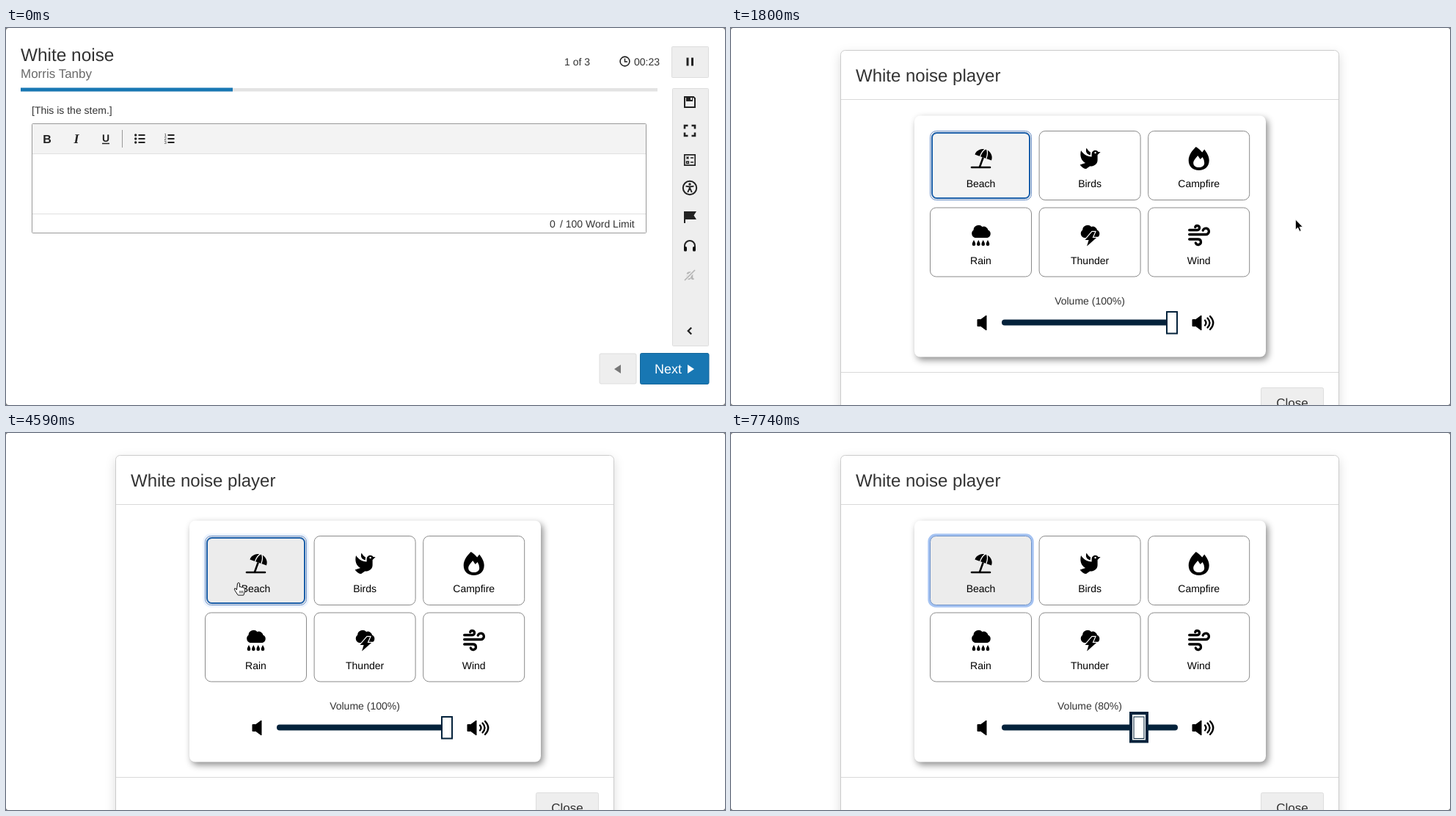
Recreate the animation shown at these times as an HTML page. Size 980x514 px, loop 8250 ms.

```html
<!DOCTYPE html>
<html lang="en">
<head>
<meta charset="utf-8">
<title>White noise player</title>
<style>
html, body { margin: 0; width: 100%; height: 100%; overflow: hidden; background: #777; }
svg { display: block; width: 980px; height: 514px; border-radius: 4px; background: #fff;
  font: 14px "Liberation Sans", Arial, sans-serif; text-rendering: geometricPrecision; }
.line { fill: none; stroke: currentColor; stroke-width: 2; }
.mid { text-anchor: middle; }
#dialog .frame { filter: drop-shadow(0 5px 7px rgba(0,0,0,.14)); }
#dialog .card { filter: drop-shadow(3px 4px 5px rgba(0,0,0,.45)); }
</style>
</head>
<body>
<svg id="stage" viewBox="0 0 980 514"></svg>
<script>
const LOOP = 8250, NAVY = '#04223b', BLUE = '#1877b3';

const at = (x, y, body, extra = '') => `<g transform="translate(${x} ${y})" ${extra}>${body}</g>`;
const path = (d, extra = '') => `<path d="${d}" ${extra}/>`;
const line = (d, width = 2, extra = '') => path(d, `class="line" style="stroke-width:${width}" ${extra}`);
const box = (x, y, w, h, fill, stroke = 'none', r = 0, extra = '') =>
  `<rect x="${x}" y="${y}" width="${w}" height="${h}" rx="${r}" fill="${fill}" stroke="${stroke}" ${extra}/>`;
const text = (x, y, s, size = 14, fill = '#333', extra = '') =>
  `<text x="${x}" y="${y}" font-size="${size}" fill="${fill}" ${extra}>${s}</text>`;

const tools = [
  [101, line('M-7-7H5L7-5V7H-7Z') + path('M-5-7H4V-1H-5Z') + path('M1-6h2v3h-2z', 'fill="#eee"')],
  [140, line('M-7-2.5V-7H-2.5M2.5-7H7V-2.5M7 2.5V7H2.5M-2.5 7H-7V2.5', 2.6)],
  [180, line('M-7.2-7.2H7.2V7.2H-7.2Z', 1.7) + line('M-4.5-4.5l3 3m0-3l-3 3M1-3H5M1 3H5M-4.5 2h3v2.5h-3z', 1.4)],
  [218, '<circle r="9.2" class="line"/><circle cy="-5" r="1.7"/>' +
    line('M-5.5-2.3L0-1.5L5.5-2.3M-2.8 6L0 0L2.8 6M0-2V1', 1.8)],
  [258, path('M-8-8H9L5.5-2.5L9 3H-6V8H-8Z')],
  [297, line('M-7 5V0a7 7 0 0 1 14 0V5', 2) + box(-8, 1, 4, 6.5, '#111', 'none', 1.5) + box(4, 1, 4, 6.5, '#111', 'none', 1.5)],
  [337, text(0, 6, 'a', 20, '#b5b5b5', 'class="mid" font-weight="bold"') +
    line('M-7 7L7-7', 4, 'color="#eee"') + line('M-7 7L7-7', 1.7, 'color="#b5b5b5"')],
  [413, line('M2.2-4.5L-2.2 0L2.2 4.5', 2.3)]
];

const rows = [-5, 0, 5];
const page = `
  ${text(20, 45, 'White noise', 24.4)}
  ${text(20, 67.5, 'Morris Tanby', 17, '#6a6a6a')}
  ${text(761, 51, '1 of 3')}
  ${at(843.5, 45.5, '<circle r="6.4" class="line" style="stroke-width:1.6"/>' + line('M0-4V.5H3.5', 1.5))}
  ${text(856, 51, '', 14, '#333', 'id="timer"')}
  ${box(20, 82, 868, 4.5, '#e3e3e3')}${box(20, 81.5, 289, 5, BLUE)}
  ${box(907.5, 25.5, 50, 42, '#eee', '#ddd', 1)}
  ${path('M927.5 40.5h3v11h-3zM934 40.5h3v11h-3z', 'id="pause"')}
  ${path('M929 41L939 46.5L929 52Z', 'id="play"')}
  ${box(908.5, 82.5, 49, 351, '#eee', '#ddd', 1)}
  ${box(909, 279, 48, 37.5, '#f6f6f6', '#1f6fb5', 0, 'stroke-width="2" id="phones"')}
  ${tools.map(([y, icon]) => at(932, y, icon)).join('')}
  ${text(35, 116.5, '[This is the stem.]')}
  ${box(35.5, 130.5, 837, 149, '#fff', '#999', 1)}
  ${box(36, 131, 836, 40, '#f3f3f3')}
  ${line('M36 171.5H872M36 253.5H872', 1, 'color="#e0e0e0"')}
  ${line('M158.5 139V163', 1, 'color="#999"')}
  ${text(56, 157, 'B', 16, '#222', 'class="mid" font-weight="bold"')}
  ${text(96, 157, 'I', 18, '#222', 'class="mid" font-weight="bold" font-style="italic" font-family="Liberation Serif, serif"')}
  ${text(136, 155, 'U', 14, '#222', 'class="mid" font-weight="bold"')}${line('M131 157.5H141', 1.4)}
  ${at(182, 151, rows.map(y => `<circle cx="-5.3" cy="${y}" r="1.7"/>` + line(`M-1.5 ${y}H7.5`)).join(''))}
  ${at(222, 151, rows.map((y, i) => text(-6.5, y + 2.2, i + 1, 6) + line(`M-1.5 ${y}H7.5`)).join(''))}
  ${text(741, 271.5, '0')}${text(755, 271.5, '/ 100 Word Limit')}
  ${box(809, 444, 50, 41, '#eee', '#ddd', 2)}${path('M838 459V471L829 465Z', 'fill="#777"')}
  ${box(864.5, 443.5, 93.5, 42, BLUE, '#14679b', 2)}
  ${text(884, 471, 'Next', 18, '#fff')}${path('M929 459V471L938 465Z', 'fill="#fff"')}`;

const cloud = path('M-8 3.5A6 6 0 0 1-10-7A7 7 0 0 1 2-11.5A6 6 0 0 1 10-7A5.6 5.6 0 0 1 9 3.5Z');
const sounds = [
  ['Beach', line('M-12.5 12H12.5', 2.6, 'stroke-linecap="round"') +
    at(2.5, -2.5, path('M-12 0A12 11.5 0 0 1 12 0Z') + line('M0 0V14', 2.6) +
      line('M-4.5 0Q-4.5-8-1-12M4.5 0Q4.5-8 1-12', 1.3, 'color="#fff"'), 'style="rotate:20deg"')],
  ['Birds', path('M14.5-9L10.5-5V2C10.5 8 5 11 0 10.5L-5 14C-8 14-11 12-13.5 8.5L-6 6C-12 3-14-4-12-11C-9-6-4-3 2.5-2.5V-6C2.5-11 9-13 11.5-9Z') +
    path('M.5-4.5C-4-6-6.500-9-4.500-14.500C-3-11.500-1-9.500 1-8.500Z') + '<circle cx="7.500" cy="-8" r="1.200" fill="#fff"/>'],
  ['Campfire', path('M-4-16C-9-11-14-5-14 2.500C-14 11-8 16 0 16S14 11 14 2.500C14-3 11-8 7.500-12.500L4.500-8.500C2-12-1-14-4-16Z') +
    path('M-1.500-4C-4-1-7.500 3-7.500 6C-7.500 10-4 12 0 12S7.500 10 7.500 6Q7.500 2 5-2L2 1Z', 'fill="#fff"')],
  ['Rain', cloud + [-9.500, -3.200, 3.200, 9.500].map(x => path(`M${x} 6.500q-4.600 8 0 8t0-8`)).join('')],
  ['Thunder', cloud + path('M3-4.500L-6.500 6.500H-1.500L-4 15L9 3.500H3.500L7-4.500Z', 'stroke="#fff" stroke-width="2.4" paint-order="stroke"')],
  ['Wind', line('M-13-7H-2a3 3 0 1 0-3-4M-13-1H9.500a4.200 4.200 0 1 0-4-5.500M-13 5.500H-1a3.700 3.700 0 1 1-3.400 5', 3.3, 'stroke-linecap="round"')]
].map(([name, icon], i) => ({ name, icon, x: 271.5 + i % 3 * 148.6, y: i < 3 ? 140.5 : 245 }));

const soundButton = ({ name, icon, x, y }) => at(x, y, `
  ${box(-1.5, -1.5, 141, 97, 'none', '#a5c3f2', 9, 'stroke-width="3.4" class="ring"')}
  ${box(0, 0, 138, 94, '#fff', '#8a8a8a', 8, 'class="face"')}
  ${box(2.5, 2.5, 133, 89, 'none', '#1b5faa', 6.5, 'stroke-width="2" class="inner"')}
  ${at(69, 37.5, icon)}
  ${text(69, 76.5, name, 14, '#000', 'class="mid"')}`, 'class="sound"');

const speaker = path('M-7.5-4.500h4.500l7.500-5.500v20l-7.500-5.500h-4.500z', 'stroke="#000" stroke-linejoin="round"');
const dialog = `
  ${box(149.5, 30.5, 679, 560, '#fff', '#ccc', 6, 'class="frame"')}
  ${line('M150 97.5H828M150 469.5H828', 1, 'color="#d9d9d9"')}
  ${text(170, 73, 'White noise player', 24)}
  ${box(250, 119.5, 479, 329, '#fff', 'none', 8, 'class="card"')}
  ${sounds.map(soundButton).join('')}
  ${text(489, 377, '', 14, '#333', 'class="mid" id="volume"')}
  ${box(369, 397.5, 240, 8, NAVY, 'none', 4)}
  <g id="thumb">
    ${box(-11, 382, 22, 38.5, '#fff', NAVY, 0, 'stroke-width="4" id="halo"')}
    ${box(-7, 387, 14, 29.5, '#fff', NAVY, 0, 'id="knob"')}
  </g>
  ${at(343.5, 402, speaker)}${at(636.5, 402, speaker)}
  ${line('M646 398.5q3 3.500 0 7M649.5 395.5q6 6.500 0 13M653 393q8.500 9 0 18', 2.3, 'stroke-linecap="round"')}
  ${box(722.5, 490.5, 85, 42, '#eee', '#ddd', 2)}
  ${text(765, 517, 'Close', 17, '#333', 'class="mid"')}`;

const stage = document.getElementById('stage');
stage.innerHTML = `
  <g fill="#222" color="#222">${page}</g>
  ${box(0, 0, 980, 514, '#fff', 'none', 0, 'id="veil"')}
  <g id="dialog" color="#000">${dialog}</g>
  <circle id="press" fill="none" stroke="#111" stroke-width="1.4"/>
  <g id="cursor">
    ${path('M0 0V14.500L3.300 11.400L5.600 16.600L8 15.600L5.800 10.500H10.300Z', 'id="arrow" fill="#000" stroke="#fff"')}
    <g id="hand" stroke="#111">
      ${path('M-1.500 1q1.500-2 3 0v5q1.500-1 2.500.4q1.500-.8 2.400.5q1.800-.4 2.200 1v4l-1.800 5.200h-7.500l-3.600-5.200q-2.200-3.200-1-4t2.800 2Z', 'fill="#fff"')}
      ${path('M1.800 11v3.500m2-3.500v3.500m2-3.500v3.500', 'fill="none" stroke-width=".8"')}
    </g>
  </g>`;

const $ = id => document.getElementById(id);
const set = (el, attrs) => { for (const k in attrs) el.setAttribute(k, attrs[k]); };
const show = (el, on) => { el.style.display = on ? '' : 'none'; };
const ramp = (t, a, b) => Math.min(1, Math.max(0, (t - a) / (b - a)));
const smooth = u => u * u * (3 - 2 * u);
const faces = [...stage.querySelectorAll('.sound')].map(g =>
  ['ring', 'face', 'inner'].map(c => g.querySelector('.' + c)));

// time, x, y
const route = [
  [130, 757, 520], [450, 850, 400], [600, 850, 400], [1050, 930, 296], [1500, 930, 296],
  [2220, 505, 203], [3040, 505, 203], [3500, 245, 200], [4120, 245, 200], [4350, 317, 204],
  [5580, 317, 204], [6390, 602, 404], [6450, 602, 404], [6840, 547, 404], [7600, 547, 404], [7740, 505, 490]
];

function pointer(t) {
  const i = Math.max(1, route.findIndex(k => k[0] > t));
  const [a, b] = [route[i - 1], route[i]];
  const u = ramp(t, a[0], b[0]);
  const e = a[0] === 6450 ? 1 - (1 - u) ** 2 : smooth(u);
  return [a[1] + (b[1] - a[1]) * e, a[2] + (b[2] - a[2]) * e];
}

function draw(t) {
  const visible = t >= 130 && t < 7740;
  const [x, y] = visible ? pointer(t) : [-99, -99];
  const inside = (l, top, w, h) => x >= l && x <= l + w && y >= top && y <= top + h;

  $('timer').textContent = t < 180 ? '00:23' : t < 1180 ? '00:24' : '00:25';
  show($('pause'), t < 1200);
  show($('play'), t >= 1200);
  const onPhones = inside(908, 278, 49, 39);
  show($('phones'), onPhones || t > 1200);

  $('veil').style.opacity = ramp(t, 1200, 1540);
  $('dialog').style.opacity = ramp(t, 1200, 1488);

  const focus = t < 1560 ? -1 : t < 2430 ? 0 : t < 4590 ? 1 : t < 6450 ? 0 : -1;
  const chosen = t < 2430 ? -1 : t < 4590 ? 1 : 0;
  const glow = ramp(t, chosen ? 2400 : 4560, chosen ? 2520 : 4710);
  let overButton = false;
  sounds.forEach((s, i) => {
    const [ring, face, inner] = faces[i];
    const hover = t > 1440 && inside(s.x, s.y, 138, 94);
    const lit = hover || i === focus, on = i === chosen;
    overButton = overButton || hover;
    ring.style.opacity = on ? glow : 0;
    set(face, { fill: on ? '#ececec' : lit ? '#f3f3f3' : '#fff', stroke: on || lit ? '#6c91c8' : '#8a8a8a' });
    show(inner, lit);
  });

  const grabbed = t >= 6450;
  const level = grabbed ? Math.min(10, Math.round((x - 376) / 22.5)) : 10;
  const volume = t >= 6840 ? 80 : level * 10;
  $('volume').textContent = `Volume (${volume}%)`;
  set($('thumb'), { transform: `translate(${376 + volume * 2.25} 0)` });
  show($('halo'), grabbed);
  set($('knob'), { 'stroke-width': grabbed ? 1 : 2 });

  show($('press'), grabbed && t < 7230);
  set($('press'), { cx: x, cy: y, r: 30.5 * ramp(t, 6430, 6560) });

  const hand = overButton || grabbed || (t > 1500 && inside(592, 384, 18, 34)) || (t < 1230 && onPhones);
  show($('cursor'), visible);
  set($('cursor'), { transform: `translate(${x} ${y})` });
  show($('hand'), hand);
  show($('arrow'), !hand);
}

const start = performance.now();
function tick() {
  draw((performance.now() - start) % LOOP);
  requestAnimationFrame(tick);
}
tick();
</script>
</body>
</html>
```
